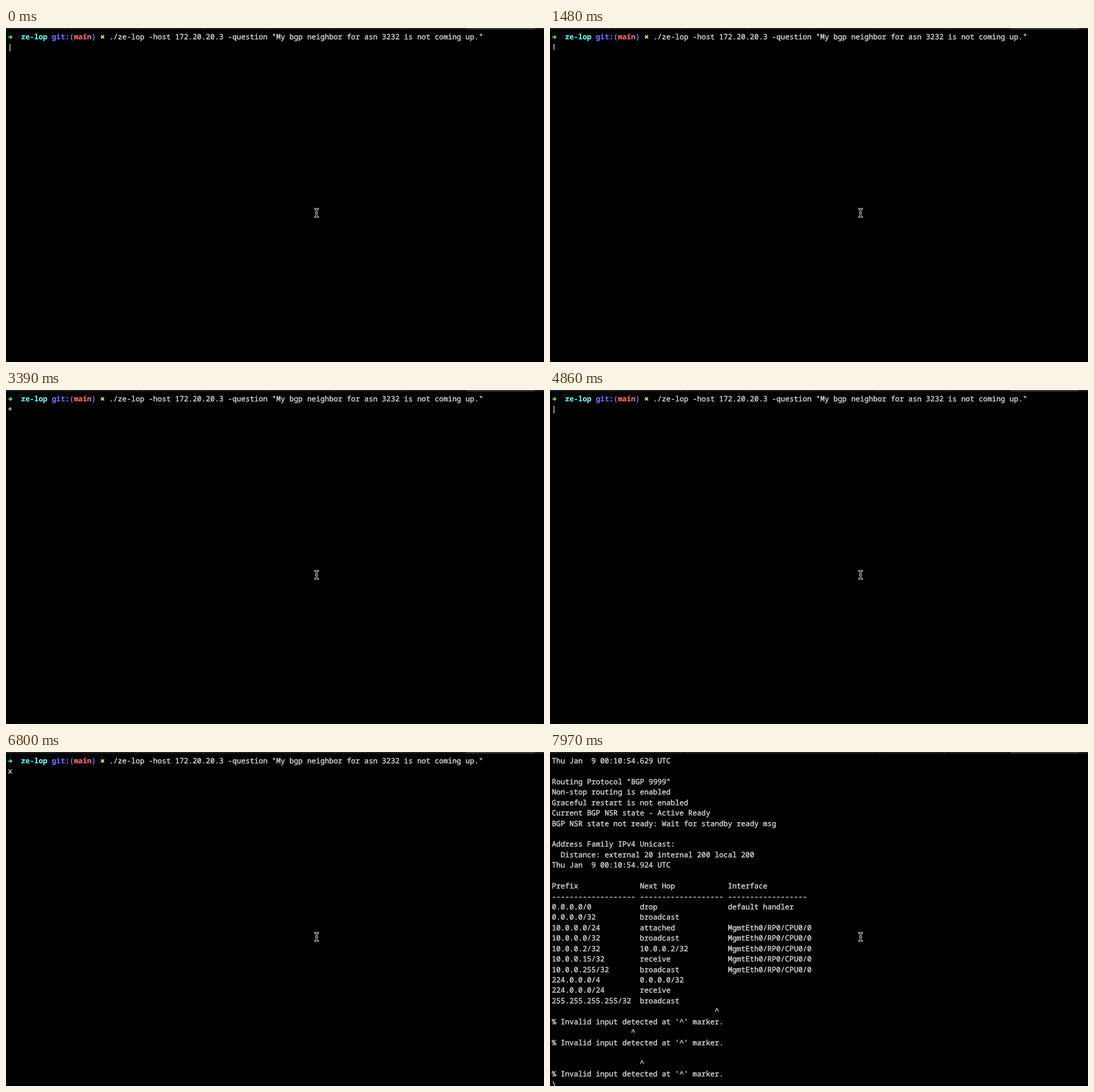
Write an HTML page that moves like this. It is 949 px wide and 590 px high and loops after 8 s.

```html
<!DOCTYPE html>
<html lang="en">
<head>
<meta charset="utf-8">
<title>Terminal</title>
<style>
  html, body { margin: 0; width: 100%; height: 100%; overflow: hidden; background: #000; }
  svg { display: block; width: 949px; height: 590px; }
  text {
    font: 500 12.945px "Noto Sans Mono", "DejaVu Sans Mono", monospace;
    font-variant-ligatures: none;
    text-rendering: geometricPrecision;
    white-space: pre;
    color: #cbcbcb;
    fill: currentColor;
    stroke: currentColor;
    stroke-width: 0.5px;
  }
  .bold { font-weight: 700; stroke-width: 0.15px; }
</style>
</head>
<body>
<svg viewBox="0 0 949 590">
  <rect width="949" height="590"/>
  <g id="tabs"><rect width="949" height="2.5" fill="#20211f"/></g>
  <g id="prompt">
    <path d="M3.5 16H10M7.3 13.2L10.2 16L7.3 18.8" fill="none" stroke="#5ffa68" stroke-width="1.7"/>
    <path d="M167.6 13.1L172.9 18.4M172.9 13.1L167.6 18.4" stroke="#fffc67" stroke-width="1.8"/>
  </g>
  <g id="output"></g>
  <text id="spin" x="3.2"></text>
  <g id="pointer" fill="none" stroke-linecap="round" stroke-linejoin="round"></g>
</svg>
<script>
const LOOP = 8000, REPLY = 6950;
const CELL = 7.767, ROW = 18.43, LEFT = 3.2, BASE = 20;
const $ = id => document.getElementById(id);

function add(parent, tag, attrs, text = '') {
  const el = document.createElementNS(parent.namespaceURI, tag);
  for (const key in attrs) el.setAttribute(key, attrs[key]);
  el.textContent = text;
  parent.append(el);
}

const put = (parent, col, row, text, attrs = {}) =>
  add(parent, 'text', { x: LEFT + col * CELL, y: BASE + row * ROW, ...attrs }, text);

// Tab strip along the top edge
for (let i = 0; i < 7; i++)
  add($('tabs'), 'rect', { x: 113.5 + i * 116.55, width: 1, height: 2.5, fill: '#43443f' });
add($('tabs'), 'rect', { x: 813, width: 120, height: 2.5, fill: '#3b3c37' });

// Command line
const bold = (col, text, color) =>
  put($('prompt'), col, 0, text, { class: 'bold', style: `color:${color}` });
bold(3, 'ze-lop', '#60fdff');
bold(10, 'git:(', '#6b72ff');
bold(15, 'main', '#ff6e67');
bold(19, ')', '#6b72ff');
put($('prompt'), 23, 0,
  './ze-lop -host 172.20.20.3 -question "My bgp neighbor for asn 3232 is not coming up."');

// Command output
const route = (prefix, hop, port = '') => prefix.padEnd(20) + hop.padEnd(20) + port;
const dash = n => '-'.repeat(n);
const caret = col => ' '.repeat(col) + '^';
const mgmt = 'MgmtEth0/RP0/CPU0/0';
const invalid = "% Invalid input detected at '^' marker.";
[
  'Thu Jan  9 00:10:54.629 UTC',
  '',
  'Routing Protocol "BGP 9999"',
  'Non-stop routing is enabled',
  'Graceful restart is not enabled',
  'Current BGP NSR state - Active Ready',
  'BGP NSR state not ready: Wait for standby ready msg',
  '',
  'Address Family IPv4 Unicast:',
  '  Distance: external 20 internal 200 local 200',
  'Thu Jan  9 00:10:54.924 UTC',
  '',
  route('Prefix', 'Next Hop', 'Interface'),
  route(dash(19), dash(19), dash(18)),
  route('0.0.0.0/0', 'drop', 'default handler'),
  route('0.0.0.0/32', 'broadcast'),
  route('10.0.0.0/24', 'attached', mgmt),
  route('10.0.0.0/32', 'broadcast', mgmt),
  route('10.0.0.2/32', '10.0.0.2/32', mgmt),
  route('10.0.0.15/32', 'receive', mgmt),
  route('10.0.0.255/32', 'broadcast', mgmt),
  route('224.0.0.0/4', '0.0.0.0/32'),
  route('224.0.0.0/24', 'receive'),
  route('255.255.255.255/32', 'broadcast'),
  caret(37), invalid,
  caret(18), invalid,
  '',
  caret(20), invalid
].forEach((line, row) => line && put($('output'), 0, row, line));

// I-beam mouse pointer: light outline around a dark core
const beam = 'M545 319.5Q547.8 319.5 547.8 322.5Q547.8 319.5 550.6 319.5' +
  'M547.8 322.5V330.5M546.6 326.5H549M545 333.5Q547.8 333.5 547.8 330.5Q547.8 333.5 550.6 333.5';
add($('pointer'), 'path', { d: beam, stroke: '#e4e4e4', 'stroke-width': 3 });
add($('pointer'), 'path', { d: beam, stroke: '#000', 'stroke-width': 1.2 });

// Spinner phases: start time, first tick, tick length
const phases = [[0, 0, 147.15], [4860, 33, 149.2], [REPLY, 0, 145.6]];
const waiting = '|+x/-\\|/-\\!', working = '|/-\\';

function draw(t) {
  const [start, first, step] = phases.findLast(p => t >= p[0]);
  const tick = first + Math.floor((t - start) / step);
  const replied = t >= REPLY;
  const glyphs = replied ? working : waiting;
  $('prompt').style.display = replied ? 'none' : '';
  $('output').style.display = replied ? '' : 'none';
  $('spin').setAttribute('y', BASE + (replied ? 31 : 1) * ROW);
  $('spin').textContent = glyphs[tick % glyphs.length];
}

const begin = performance.now();
function loop() {
  draw((performance.now() - begin) % LOOP);
  requestAnimationFrame(loop);
}
loop();
</script>
</body>
</html>
```
